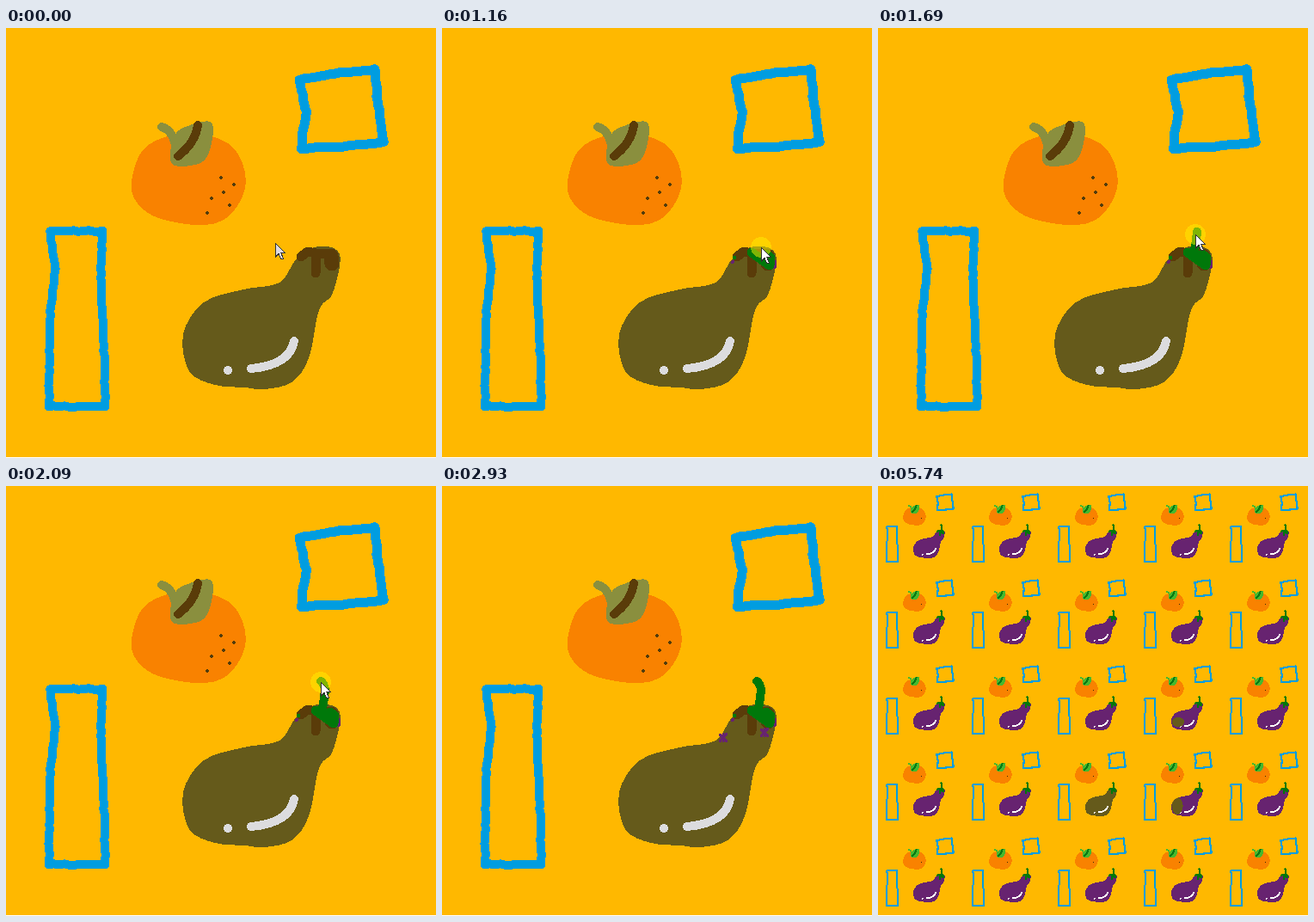
An HTML page that plays this animation: 500 by 500 pixels, repeating every 7070 ms.

```html
<!DOCTYPE html>
<html lang="en">
<head>
<meta charset="utf-8">
<title>Fruit pattern painting</title>
<style>
  html, body { margin: 0; width: 100%; height: 100%; overflow: hidden; background: #fff; }
  svg { display: block; width: 100%; height: 100%; }
  svg * { shape-rendering: crispEdges; }
  .line { fill: none; stroke-linecap: round; stroke-linejoin: round; }
  #draft { --body: #655a1b; --cap: #5a3c09; --leaf: #8a8f3e; --vein: #5a3c09; --dot: #523c0c; --shine: #dcdcde; }
  #tiles { --body: #672370; --cap: #00780a; --leaf: #46b82e; --vein: #087a14; --dot: none; --shine: #fff; }
  #tiles .olive { --body: #655a1b; }
</style>
</head>
<body>
<svg viewBox="0 0 500 500">
  <defs id="defs"></defs>
  <rect width="500" height="499" fill="#ffb800"/>
  <g id="draft"></g>
  <g id="tiles"></g>
  <circle id="glow" r="12" fill="#fff000" fill-opacity=".5"/>
  <path id="cursor" d="M.5 .5V16L4 12.500L7 19L9.500 18L6.800 11.700H11.700Z" stroke="#333"/>
</svg>
<script>
const $ = id => document.getElementById(id);
const LOOP = 7070, TILES_AT = 4580, GREEN = "#00780a", PURPLE = "#672370", OLIVE = "#655a1b";

let seed = 7;
const random = () => (seed = seed * 16807 % 2147483647) / 2147483647;
const parse = text => text.split(" ").map(p => p.split(",").map(Number));
const mix = (a, b, u) => a.map((v, k) => v + (b[k] - v) * u);

// Smooth closed outline through the given points
function blob(text) {
  const p = parse(text), n = p.length, at = i => p[(i + n) % n];
  const pull = (a, from, to, s) => a.map((v, k) => v + s * (to[k] - from[k]) / 6);
  return `M${p[0]}` + p.map((a, i) => {
    const b = at(i + 1);
    return `C${pull(a, at(i - 1), b, 1)} ${pull(b, a, at(i + 2), -1)} ${b}`;
  }).join("") + "Z";
}

// Hand-drawn closed line: straight sides with small seeded wobbles
function wobble(text) {
  const p = parse(text);
  const dots = p.flatMap((a, i) => {
    const b = p[(i + 1) % p.length], n = Math.ceil(Math.hypot(b[0] - a[0], b[1] - a[1]) / 6);
    return Array.from({ length: n }, (_, k) => mix(a, b, k / n).map(v => v + random() * 1.6 - .8));
  });
  return "M" + dots.join("L") + "Z";
}

const fill = (d, color) => `<path d="${d}" fill="${color}"/>`;
const line = (d, color, width, more = "") =>
  `<path class="line" d="${d}" stroke="${color}" stroke-width="${width}" ${more}/>`;
const use = (ref, more = "") => `<use href="#${ref}" ${more}/>`;

function build() {
  const body = blob("338,268 318,296 276,304 230,319 206,356 213,399 243,415 278,418 300,420 332,412 352,384 364,328 380,308 388,263 363,254");
  const scene =
    line(wobble("342,60 382,53 429,48 432,85 439,133 390,138 343,140 349,98"), "#009de0", 11) +
    line(wobble("51,236 112,236 110,290 114,375 116,440 50,440 51,335 57,280"), "#009de0", 10) +
    fill(blob("146,178 163,138 212,122 262,137 279,178 263,215 232,229 180,222 153,204"), "#f98200") +
    line("M181 115Q195 119 198 142", "var(--leaf)", 10) +
    fill(blob("193,158 196,125 214,113 239,110 238,138 226,157"), "var(--leaf)") +
    line("M223 113Q220 134 200 149", "var(--vein)", 10) +
    line("M250 174h0M265 182h0M253 191h0M239 198h0M260 206h0M234 215h0", "var(--dot)", 3.5) +
    fill(body, "var(--body)") +
    line("M343 266L351 260L365 263L378 262M360 266V285", "var(--cap)", 11) +
    line("M378 265L379 274", "var(--cap)", 17) +
    line("M258 398h0M285 396Q330 392 335 364", "var(--shine)", 10);

  $("defs").innerHTML =
    `<clipPath id="bodyClip"><path d="${body}"/></clipPath><g id="scene">${scene}</g>` +
    line("M377 263L382 267L381 276L360 261", GREEN, 11, 'id="crown" pathLength="1"') +
    line("M368 259L370 246L371 237Q370 230 366 227", GREEN, 10, 'id="stem" pathLength="1"') +
    `<g id="tile">${use("scene")}${use("crown")}${use("stem")}${fill("M250 183h6v6h-6z", "#3a2a08")}</g>`;

  const star = "m-4 5l8 -9m-8 1l8 8m-4 -9v9";
  $("draft").innerHTML = use("scene") +
    `<g id="specks">${line("M340 267h0", GREEN, 5)}${line("M338 272h0M387 272v6", PURPLE, 4)}</g>` +
    use("crown", 'id="crownStroke"') + use("stem", 'id="stemStroke"') +
    line("M375 286" + star, PURPLE, 3, 'id="markRight"') +
    line("M327 292" + star, PURPLE, 3, 'id="markLeft"');

  const cell = (col, row, html, name = "") =>
    `<g class="${name}" transform="translate(${col * 100} ${row * 100}) scale(.2)">${html}</g>`;
  const patch = (cx, cy, rx, ry) =>
    `<ellipse clip-path="url(#bodyClip)" cx="${cx}" cy="${cy}" rx="${rx}" ry="${ry}" fill="${OLIVE}"/>`;
  let tiles = "";
  for (let i = 0; i < 25; i++)
    tiles += cell(i % 5, Math.floor(i / 5), use("tile"), i === 17 ? "olive" : "");
  $("tiles").innerHTML = tiles + cell(3, 2, patch(245, 372, 35, 28)) + cell(3, 3, patch(240, 360, 33, 50));
}

// Cursor moves: start, end, number of steps, points spread evenly over the steps
const move = (from, to, steps, path) => ({ from, to, steps, path: parse(path) });
const rest = move(0, 0, 1, "313,250"),
      start = move(70, 70, 1, "322,256"),
      paintCrown = move(320, 990, 10, "330,260 340,261 375,261 379,261 371,255"),
      paintStem = move(1160, 1860, 10, "371,255 370,245 366,230"),
      lift = move(1950, 2240, 5, "366,228 366,228 369,234"),
      leave = move(2410, 2930, 8, "369,245 375,285 324,291 88,456"),
      back = move(5670, 5670, 1, "34,483");
const moves = [rest, start, paintCrown, paintStem, lift, leave, back];

function along(path, u) {
  const s = u * (path.length - 1), i = Math.min(Math.floor(s), path.length - 2);
  return i < 0 ? path[0] : mix(path[i], path[i + 1], s - i);
}

// Share of a move that is done at time t, in whole steps
function progress({ from, to, steps }, t) {
  if (t < from) return -1;
  if (t >= to) return 1;
  return Math.floor((t - from) / (to - from) * (steps - 1) + .1) / (steps - 1);
}

const show = (id, on) => $(id).style.display = on ? "" : "none";

function reveal(id, part) {
  show(id, part > 0);
  $(id).setAttribute("stroke-dasharray", `${Math.max(part, .01)} 2`);
}

function draw() {
  const t = performance.now() % LOOP;
  const now = moves.filter(m => t >= m.from).pop();
  const place = `translate(${along(now.path, progress(now, t)).map(Math.round)})`;
  const crown = progress(paintCrown, t), exit = progress(leave, t);

  $("cursor").setAttribute("transform", place);
  $("cursor").setAttribute("fill", t < paintCrown.from ? "#deDae2" : "#fff");
  $("glow").setAttribute("transform", place);
  show("cursor", t < leave.to || (t >= back.from && t < back.from + 70));
  show("glow", t >= paintStem.from && t < 2160);

  show("draft", t < TILES_AT);
  show("tiles", t >= TILES_AT);
  show("specks", crown > .1);
  reveal("crownStroke", (crown * 9 - 3) / 6);
  reveal("stemStroke", progress(paintStem, t));
  show("markRight", exit > .2);
  show("markLeft", exit > .5);
  requestAnimationFrame(draw);
}

build();
draw();
</script>
</body>
</html>
```
